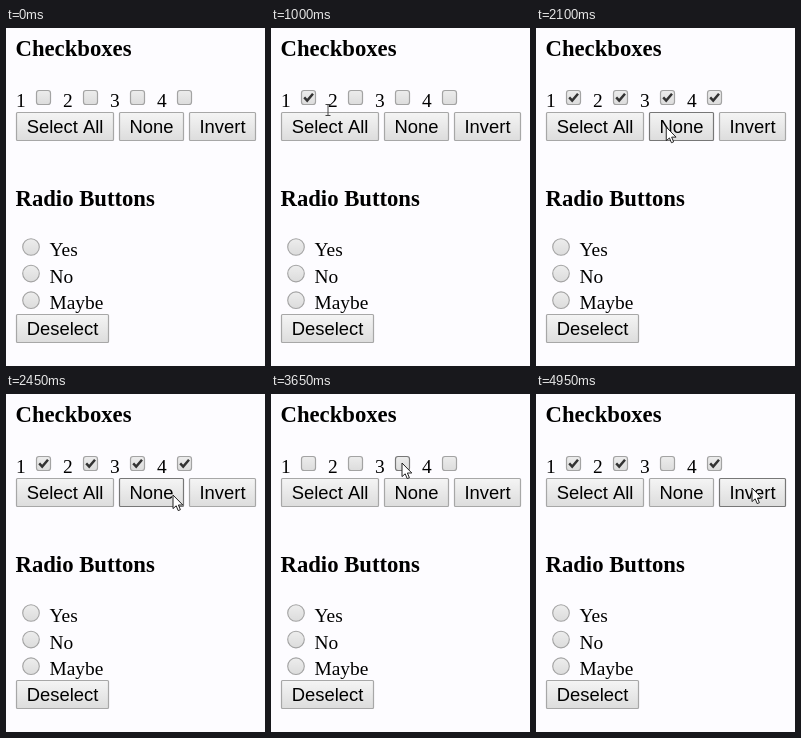
An HTML page with a canvas for the animation above (5 s loop, 259 px wide and 338 px high).

```html
<!DOCTYPE html>
<html lang="en">
<head>
<meta charset="utf-8">
<title>Checkboxes and radio buttons</title>
<style>
  html, body { margin: 0; width: 100%; height: 100%; overflow: hidden; background: #fdfcff; }
  canvas { display: block; }
</style>
</head>
<body>
<canvas id="stage"></canvas>
<script>
const W = 259, H = 338, LOOP = 5000, STEP = 50;
const SERIF = '"Liberation Serif", "Times New Roman", serif';
const SANS = '"Liberation Sans", Arial, sans-serif';
const canvas = document.getElementById('stage');
const ctx = canvas.getContext('2d');
const ratio = window.devicePixelRatio || 1;
canvas.width = W * ratio;
canvas.height = H * ratio;
canvas.style.width = W + 'px';
canvas.style.height = H + 'px';

// label, x, y, width, press time, release time
const buttons = [
  ['Select All', 10, 84, 98, 1750, 1850],
  ['None', 113, 84, 65, 2800, 2900],
  ['Invert', 183, 84, 67, 4700, 4800],
  ['Deselect', 10, 286, 93, -1, -1]
];

// time, followed by the checked boxes
const states = [
  [0, ''], [700, '1'], [1850, '1234'], [2900, ''], [3800, '3'], [4800, '124']
];

// time, x, y of the pointer tip
const path = [
  [50, 92, 150], [550, 37, 70], [800, 37, 70], [1000, 57, 82],
  [1100, 62, 88], [1400, 69, 96], [1850, 69, 96], [2250, 167, 101],
  [2900, 167, 101], [3150, 152, 83], [3350, 131, 69], [3850, 131, 69],
  [4200, 184, 90], [4600, 216, 94], [5000, 216, 94]
];

const arrow = new Path2D('M0 0V13.6L3.2 10.8L5.2 15.6L7.4 14.7L5.4 10H9.8Z');

function pointerAt(t) {
  const i = path.findIndex(p => p[0] > t);
  const [t0, x0, y0] = path[i - 1], [t1, x1, y1] = path[i];
  const k = (t - t0) / (t1 - t0);
  return { x: x0 + (x1 - x0) * k, y: y0 + (y1 - y0) * k };
}

function text(str, x, y, font, align = 'left') {
  ctx.font = font;
  ctx.textAlign = align;
  ctx.fillStyle = '#000';
  ctx.fillText(str, x, y);
}

function shade(y, h, top, bottom) {
  const g = ctx.createLinearGradient(0, y, 0, y + h);
  g.addColorStop(0, top);
  g.addColorStop(1, bottom);
  return g;
}

function box(x, y, w, h, r, fill, line) {
  ctx.beginPath();
  ctx.roundRect(x + .5, y + .5, w - 1, h - 1, r);
  ctx.fillStyle = fill;
  ctx.strokeStyle = line;
  ctx.lineWidth = 1.2;
  ctx.fill();
  ctx.stroke();
}

function inside(p, x, y, w, h) {
  return p && p.x >= x && p.x <= x + w && p.y >= y && p.y <= y + h;
}

function drawButton([label, x, y, w, down, up], t, pointer) {
  const pressed = t >= down && t < up;
  const hover = inside(pointer, x + 2, y - 1, w - 2, 29);
  const fill = pressed ? shade(y, 28, '#dedede', '#f3f3f3') : shade(y, 28, '#f5f5f5', '#dddddd');
  box(x, y, w, 29, 1, fill, hover ? '#777' : '#a7a7a7');
  text(label, x + w / 2, y + 21, '18.4px ' + SANS, 'center');
}

function drawCheckbox(n, checked, pointer) {
  const x = 30 + (n - 1) * 47, y = 62;
  const hover = inside(pointer, x, y, 15, 15);
  text(n, x - 20, 79, '19.4px ' + SERIF);
  box(x, y, 15, 15, 2.5, shade(y, 15, '#ededed', '#dcdcdc'), hover ? '#777' : '#a3a3a3');
  if (!checked) return;
  ctx.beginPath();
  ctx.moveTo(x + 3.2, y + 7.4);
  ctx.lineTo(x + 6.2, y + 10.6);
  ctx.lineTo(x + 12, y + 3.8);
  ctx.strokeStyle = '#333';
  ctx.lineWidth = 2.5;
  ctx.stroke();
}

function drawRadio(label, i) {
  const y = 219 + i * 26.6;
  ctx.beginPath();
  ctx.arc(25, y, 8.3, 0, 7);
  ctx.fillStyle = shade(y - 8, 16, '#ededed', '#dcdcdc');
  ctx.strokeStyle = '#a3a3a3';
  ctx.lineWidth = 1.1;
  ctx.fill();
  ctx.stroke();
  text(label, 43.5, y + 9, '19.4px ' + SERIF);
}

function drawPointer({ x, y }, beam) {
  ctx.save();
  ctx.translate(x, y);
  ctx.lineWidth = 1;
  if (beam) {
    ctx.strokeStyle = '#444';
    ctx.stroke(new Path2D('M-2.5 -5.5H2.5M0 -5.5V5.5M-2.5 5.5H2.5'));
  } else {
    ctx.fillStyle = '#fff';
    ctx.strokeStyle = '#222';
    ctx.fill(arrow);
    ctx.stroke(arrow);
  }
  ctx.restore();
}

function draw(now) {
  const t = Math.floor(now % LOOP / STEP) * STEP;
  const pointer = t >= path[0][0] ? pointerAt(t) : null;
  const checked = states.findLast(s => s[0] <= t)[1];
  ctx.setTransform(ratio, 0, 0, ratio, 0, 0);
  ctx.fillStyle = '#fdfcff';
  ctx.fillRect(0, 0, W, H);
  text('Checkboxes', 9.5, 28, 'bold 22.7px ' + SERIF);
  text('Radio Buttons', 9.5, 178, 'bold 22.7px ' + SERIF);
  for (let n = 1; n <= 4; n++) drawCheckbox(n, checked.includes(n), pointer);
  ['Yes', 'No', 'Maybe'].forEach(drawRadio);
  buttons.forEach(b => drawButton(b, t, pointer));
  if (pointer) drawPointer(pointer, t >= 900 && t < 1100);
}

const start = performance.now();
function tick() {
  draw(performance.now() - start);
  requestAnimationFrame(tick);
}
tick();
</script>
</body>
</html>
```
